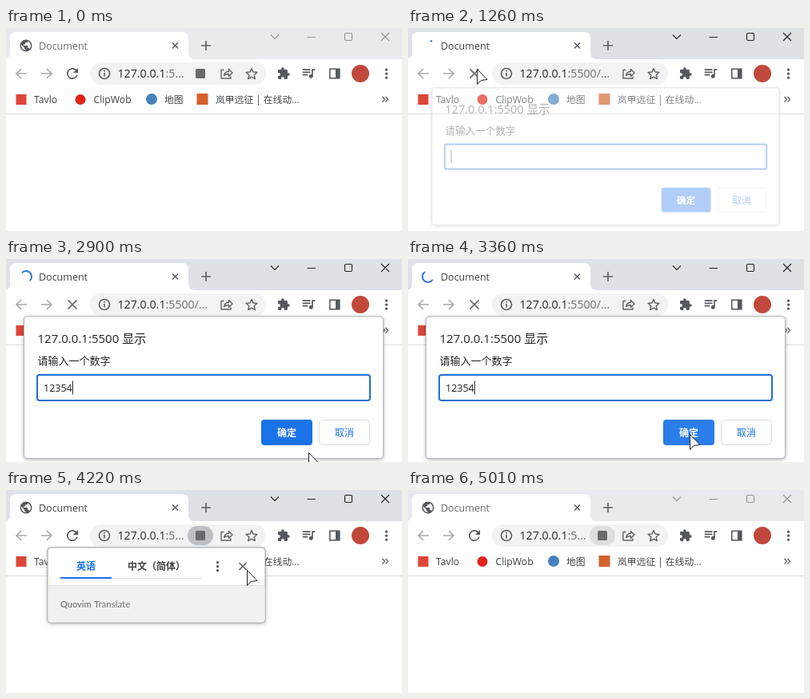
An HTML page that plays this animation: 495 by 254 pixels, repeating every 5050 ms.

```html
<!DOCTYPE html>
<html lang="zh-CN">
<head>
<meta charset="utf-8">
<title>Document</title>
<style>
html, body { margin: 0; width: 100%; height: 100%; overflow: hidden; background: #fff; }
svg { display: block; width: 495px; height: 254px; }
text { font-family: "Open Sans", "Noto Sans CJK SC", "Noto Sans CJK", sans-serif; fill: #3c4043; }
.line { fill: none; stroke: #5f6368; stroke-width: 1.7; }
.thin { stroke-width: 1.4; stroke-linejoin: round; }
.ink { fill: #55595e; }
.dim { stroke: #a9acb0; }
.url { font-size: 14.2px; fill: #24272b; }
.url tspan { fill: #6a6e73; }
.mark { font-size: 12.2px; }
.han { font-size: 11.8px; }
.bold { font-weight: 600; }
.blue { fill: #1a73e8; }
#controls { fill: none; stroke-width: 1.1; }
#dialog, #popup { filter: drop-shadow(0 1px 2px rgba(0, 0, 0, .32)); }
#dialog text { fill: #202124; }
#dialog .ok { fill: #fff; }
#dialog .blue, #popup .blue { fill: #1a73e8; }
#brand text { font-family: Lato, "Open Sans", sans-serif; fill: #757575; }
</style>
</head>
<body>
<svg viewBox="0 0 495 254">
  <defs>
    <g id="dots"><circle cy="-5" r="1.6"/><circle r="1.6"/><circle cy="5" r="1.6"/></g>
  </defs>
  <rect width="495" height="254" fill="#fff"/>

  <!-- tab strip -->
  <rect id="strip" width="495" height="39"/>
  <path fill="#fff" d="M-3 39Q5 39 5 31V13Q5 5 13 5H220Q228 5 228 13V31Q228 39 236 39Z"/>
  <path id="globe" class="ink" transform="translate(25 22) scale(.75) translate(-12 -12)" d="M12 2a10 10 0 1 0 0 20 10 10 0 0 0 0-20zm-1 17.93A8 8 0 0 1 4.21 10.21L9 15v1a2 2 0 0 0 2 2zm6.9-2.54A2 2 0 0 0 16 16h-1v-3a1 1 0 0 0-1-1H8v-2h2a1 1 0 0 0 1-1V7h2a2 2 0 0 0 2-2v-.41a8 8 0 0 1 2.9 12.8z"/>
  <path id="spinner" fill="none" stroke="#2f74d8" stroke-width="2"/>
  <text id="title" x="41" y="27" font-size="12.5">Document</text>
  <path class="line" d="M208 18.5l7 7m0-7l-7 7M244 22h12m-6-6v12"/>
  <g id="controls">
    <path d="M331 8.5l5 5 5-5M376.5 11.5h10.5M469 6l10 10m0-10l-10 10"/>
    <rect x="423.5" y="6.5" width="9" height="9" rx="1.5"/>
  </g>

  <!-- toolbar -->
  <path class="line dim" d="M26 57H13m6.2-6L13 57l6.2 6M44 57h13m-6.2-6L57 57l-6.200 6"/>
  <circle id="hover" cx="83" cy="57" r="14" fill="#ebecee"/>
  <path id="reload" class="ink" transform="translate(83 57) scale(.88) translate(-12 -12)" d="M17.65 6.35A8 8 0 1 0 19.73 14h-2.08A6 6 0 1 1 12 6c1.66 0 3.14.69 4.22 1.78L13 11h7V4z"/>
  <path id="stop" class="line" d="M77.5 51.5l11 11m0-11l-11 11"/>
  <rect x="105" y="43" width="220" height="28" rx="14" fill="#f1f3f4"/>
  <circle class="line" cx="123" cy="57" r="6.5"/>
  <path class="line" d="M123 56v4.5M123 53v1.7"/>
  <text id="shortUrl" class="url" x="139.5" y="62">127.0.0.1<tspan>:5...</tspan></text>
  <text id="longUrl" class="url" x="139.5" y="62">127.0.0.1<tspan>:5500/...</tspan></text>
  <g id="translate">
    <rect id="pill" x="227" y="45" width="32" height="24" rx="12" fill="#bdc1c6"/>
    <rect x="237" y="51" width="12" height="12" rx="1.5" fill="#686c71"/>
  </g>
  <path class="line thin" d="M272.5 52.500H269V63H281V60.500M272.500 59.500C273 56 275.500 54.500 278.500 54.500V51.500L283 56L278.500 60.500V57.500C276 57.500 274 58 272.500 59.500Z"/>
  <path class="line thin" d="M307 50.500l2 4.500 4.900.5-3.700 3.300 1.100 4.800-4.300-2.500-4.300 2.500 1.100-4.800-3.700-3.300 4.900-.5z"/>
  <path class="ink" transform="translate(347 57) scale(.7) translate(-12 -12)" d="M20.500 11H19V7c0-1.100-.9-2-2-2h-4V3.500a2.500 2.500 0 0 0-5 0V5H4c-1.100 0-2 .9-2 2v3.800h1.500a2.700 2.700 0 0 1 0 5.400H2V20c0 1.100.9 2 2 2h3.800v-1.500a2.700 2.700 0 0 1 5.400 0V22H17c1.100 0 2-.9 2-2v-4h1.500a2.500 2.500 0 0 0 0-5z"/>
  <path class="ink" transform="translate(378.500 57) scale(.82) translate(-12.500 -13)" d="M15 6H3v2h12zm0 4H3v2h12zM3 16h8v-2H3zM17 6v8.180A3 3 0 1 0 19 17V8h3V6z"/>
  <rect class="line" x="404.800" y="51.300" width="12" height="11.500"/>
  <rect class="ink" x="412" y="51" width="5" height="12"/>
  <circle cx="443" cy="57" r="11" fill="#c0493c"/>
  <use href="#dots" class="ink" x="475.500" y="57.200"/>

  <!-- bookmarks -->
  <rect x="12.500" y="83" width="13" height="13" fill="#dc4638"/>
  <text class="mark" x="35" y="94">Tavlo</text>
  <circle cx="93" cy="89.500" r="6.500" fill="#e2231a"/>
  <text class="mark" x="109.500" y="94">ClipWob</text>
  <circle cx="182" cy="89" r="7" fill="#4683bd"/>
  <text class="han" x="198" y="94">地图</text>
  <rect x="238.500" y="82" width="14" height="14" fill="#d3622c"/>
  <text class="han" x="262" y="94">岚甲远征 | 在线动...</text>
  <path class="line thin" d="M470.500 86l3 3.300-3 3.300M474.500 86l3 3.300-3 3.300"/>
  <path stroke="#dadce0" d="M0 107.500H495"/>

  <!-- prompt -->
  <g id="dialog">
    <rect x="22.500" y="72" width="449" height="177.500" rx="4" fill="#fff" stroke="#b4b6b9"/>
    <text x="39.500" y="105" font-size="15">127.0.0.1:5500 显示</text>
    <text x="39.500" y="132" font-size="13">请输入一个数字</text>
    <rect x="39" y="145" width="416" height="32" rx="3" fill="#fff" stroke="#1f6fd6" stroke-width="2"/>
    <text id="typed" x="47" y="166" font-size="12.500"></text>
    <path id="caret" stroke="#111" d="M0 152.500v17"/>
    <rect id="button" x="319" y="201" width="64" height="32" rx="4"/>
    <text class="bold ok" x="351" y="222" font-size="12" text-anchor="middle">确定</text>
    <rect x="391.500" y="201.500" width="63" height="31" rx="4" fill="#fff" stroke="#dadce0"/>
    <text class="blue" x="423" y="222" font-size="12" text-anchor="middle">取消</text>
  </g>

  <!-- translate bubble -->
  <g id="popup">
    <rect x="52" y="72" width="272" height="94" rx="4" fill="#fff" stroke="#a2a4a7"/>
    <path fill="#f1f1f1" d="M52.500 119.500H323.500V162Q323.500 165.500 320 165.500H56Q52.500 165.500 52.500 162Z"/>
    <path stroke="#dadce0" d="M52.500 119.500H323.500M132 110.500H244"/>
    <rect class="blue" x="68" y="109" width="64" height="2"/>
    <text class="bold blue" x="88" y="100" font-size="12">英语</text>
    <text class="bold" x="152" y="100" font-size="12">中文（简体）</text>
    <use href="#dots" class="ink" x="264.500" y="95.700"/>
    <path class="line" d="M291.500 91l9 9m0-9l-9 9"/>
    <g id="brand">
      <text class="bold" x="68" y="147" font-size="11">Quovim</text>
      <text x="110" y="147" font-size="11.500">Translate</text>
    </g>
  </g>

  <path id="arrow" fill="#fff" stroke="#222" stroke-linejoin="round" d="M.5.5V19.500L5.200 14.500L13 13.500Z"/>
  <path id="beam" fill="#8a8a8a" stroke="#333" stroke-width=".8" d="M-4.500-8.500h9v2.500h-3v12h3v2.500h-9V6h3V-6h-3z"/>
</svg>
<script>
const LOOP = 5050;
const $ = id => document.getElementById(id);
const set = (id, attrs) => { for (const k in attrs) $(id).setAttribute(k, attrs[k]); };
const show = (id, on) => { $(id).style.display = on ? "" : "none"; };
const within = (t, a, b) => t >= a && t < b;
const ramp = (t, a, b) => Math.min(1, Math.max(0, (t - a) / (b - a)));
const smooth = p => p * p * (3 - 2 * p);

// pointer route: time, x, y
const route = [
  [210, 318, 226], [400, 151, 158], [520, 101, 133], [600, 62, 106], [720, 86, 51],
  [1290, 86, 51], [1560, 150, 118], [1780, 200, 158], [2400, 200, 158],
  [2840, 378, 242], [2910, 378, 242], [3180, 352, 219], [3470, 352, 219],
  [3560, 361, 221], [3680, 361, 221], [4080, 301, 100], [4330, 301, 100],
  [4520, 425, 228], [4620, 430, 256]
];
const keys = [1920, 2030, 2130, 2220, 2290];

function pointer(t) {
  const i = route.findIndex(k => k[0] > t);
  if (i < 1) return null;
  const [t0, x0, y0] = route[i - 1], [t1, x1, y1] = route[i];
  const p = smooth(ramp(t, t0, t1));
  return [x0 + (x1 - x0) * p, y0 + (y1 - y0) * p];
}

// arc that grows, then shrinks, while turning
function arc(ms) {
  const step = Math.floor(ms / 666), p = smooth(ms % 666 / 666), odd = step % 2;
  const start = 270 + 360 * ms / 1568 + 270 * (step >> 1) + (odd ? 270 * p : 0);
  const sweep = Math.max(5, 270 * (odd ? 1 - p : p));
  const at = deg => {
    const a = deg * Math.PI / 180;
    return `${25 + 7 * Math.cos(a)} ${22 + 7 * Math.sin(a)}`;
  };
  return `M${at(start)}A7 7 0 ${+(sweep > 180)} 1 ${at(start + sweep)}`;
}

function panel(id, p, cx, cy) {
  const s = .95 + .05 * p;
  show(id, p > 0);
  set(id, { opacity: p, transform: `translate(${cx} ${cy}) scale(${s}) translate(${-cx} ${-cy})` });
}

function render(t) {
  const active = within(t, 990, 4640);
  const loading = within(t, 1080, 3460);
  const spinning = within(t, 1150, 3460);

  set("strip", { fill: active ? "#dee1e6" : "#e8eaed" });
  set("controls", { stroke: active ? "#222" : "#919396" });
  $("title").style.fill = active ? "#3c4043" : "#66696e";
  show("globe", !spinning);
  show("spinner", spinning);
  if (spinning) set("spinner", { d: arc(t - 1150) });

  show("hover", within(t, 690, 1240));
  show("reload", !loading);
  show("stop", loading);
  show("shortUrl", !loading);
  show("longUrl", loading);
  show("translate", !loading);
  set("pill", { opacity: t < 3500 ? 0 : 1 - .6 * ramp(t, 4380, 4500) });

  panel("dialog", ramp(t, 1220, 1340) - ramp(t, 3370, 3480), 247, 160);
  panel("popup", ramp(t, 3510, 3610) - ramp(t, 4310, 4410), 188, 119);

  const count = keys.filter(k => t >= k).length;
  $("typed").textContent = "12354".slice(0, count);
  set("caret", { transform: `translate(${47.5 + count * 7.15} 0)` });

  const pos = pointer(t);
  const [x, y] = pos || [0, 0];
  const dialogUp = within(t, 1290, 3400);
  const inField = dialogUp && within(x, 39, 455) && within(y, 145, 178);
  const hidden = !pos || within(t, keys[0], 2420);
  show("beam", !hidden && inField);
  show("arrow", !hidden && !inField);
  set(inField ? "beam" : "arrow", { transform: `translate(${x} ${y})` });
  const onButton = dialogUp && within(x, 319, 383) && within(y, 201, 233);
  set("button", { fill: onButton ? "#2b7de9" : "#1a73e8" });
}

const began = performance.now();
function tick() {
  render((performance.now() - began) % LOOP);
  requestAnimationFrame(tick);
}
tick();
</script>
</body>
</html>
```
